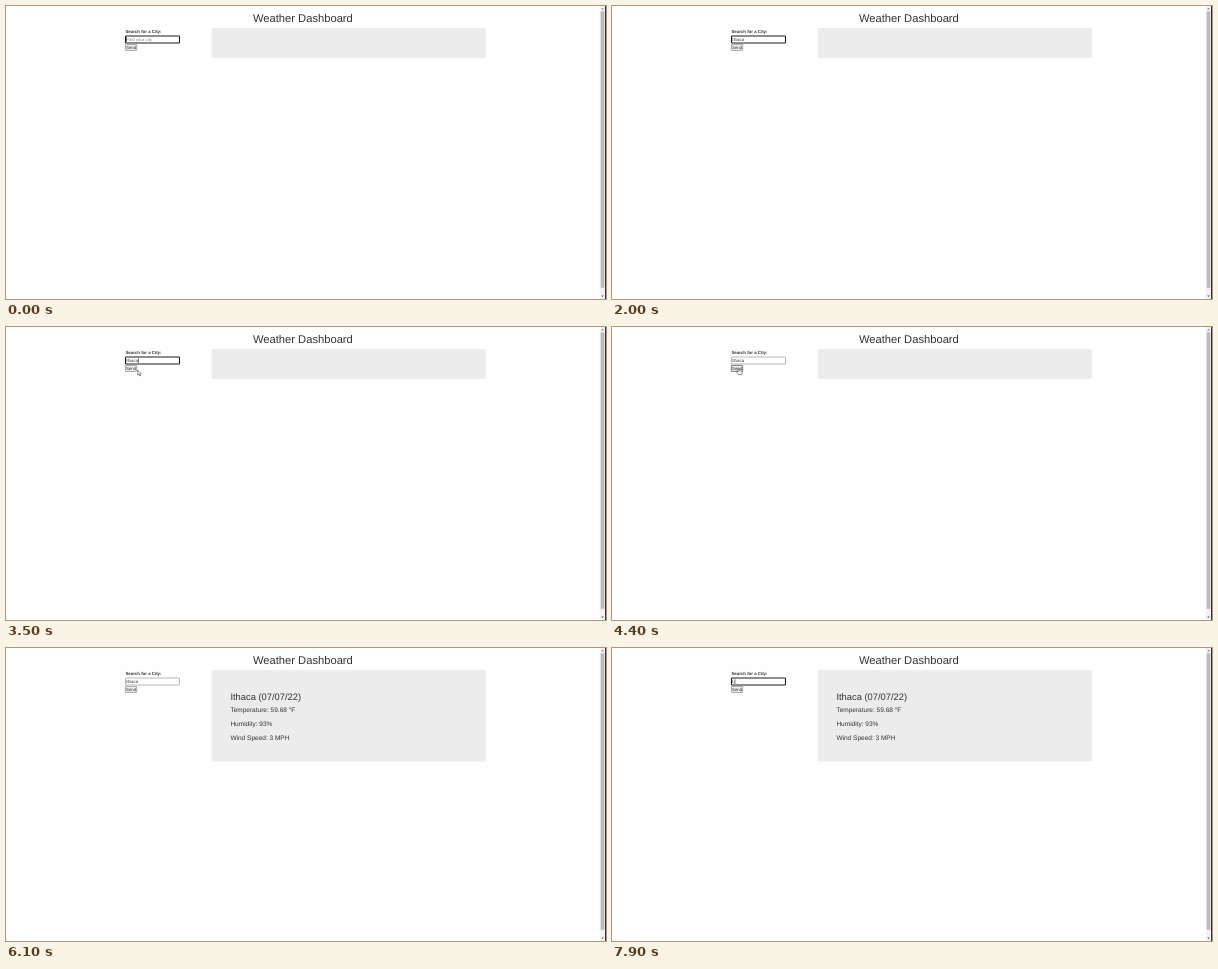
Write an HTML page that moves like this. It is 600 px wide and 293 px high and loops after 8 s.

```html
<!DOCTYPE html>
<html lang="en">
<head>
<meta charset="utf-8">
<title>Weather Dashboard</title>
<style>
html, body { margin: 0; width: 100%; height: 100%; overflow: hidden; background: #fefefe; }
svg { display: block; width: 600px; height: 293px; }
text {
  font: 4.36px "Liberation Sans", Arial, sans-serif;
  fill: #333;
  text-rendering: geometricPrecision;
  white-space: pre;
}
.title { font-size: 11.2px; }
.label { font-weight: bold; }
.city { font-size: 9.35px; }
.fact { font-size: 6.53px; }
.cursor { stroke-linejoin: round; fill: #fff; stroke: #222; stroke-width: .5; }
</style>
</head>
<body>
<svg viewBox="0 0 600 293">
  <rect width="600" height="293" fill="#fefefe"/>
  <text class="title" x="246.9" y="16.4">Weather Dashboard</text>
  <text class="label" x="119.4" y="26.5">Search for a City:</text>

  <rect id="field" x="119.5" y="30" width="54" height="7" rx=".7" fill="#fff"/>
  <rect id="selection" y="31" height="5.2" fill="#2f86ee"/>
  <text id="entry" x="120.2" y="35"></text>
  <rect id="caret" y="31.2" width=".6" height="4.8" fill="#222"/>

  <rect id="button" x="119.4" y="38.4" width="11.3" height="6" rx=".5" fill="#efefef" stroke-width=".7"/>
  <text x="120" y="42.9">Send</text>

  <rect id="panel" x="205.6" y="22.1" width="274.3" rx="1.9" fill="#edecec"/>
  <g id="report">
    <text class="city" x="224.4" y="51.7">Ithaca (07/07/22)</text>
    <text class="fact" x="224.4" y="63.7">Temperature: 59.68 °F</text>
    <text class="fact" x="224.4" y="77.8">Humidity: 93%</text>
    <text class="fact" x="224.4" y="91.9">Wind Speed: 3 MPH</text>
  </g>

  <rect x="593.8" width="5.2" height="293" fill="#f1f1f1"/>
  <rect x="594.7" y="5.3" width="3.7" height="276.5" fill="#bcbcbc"/>
  <path d="M595.3 3.3h2.4l-1.2-1.4zM595.3 289.6h2.4l-1.2 1.4z" fill="#505050"/>
  <rect x="599" width="1" height="293" fill="#333"/>

  <g id="pointer">
    <path id="arrow" class="cursor" d="M0 0V5L1.2 4L2 5.8L2.8 5.4L2 3.7H3.5Z"/>
    <path id="hand" class="cursor" d="M0 .4Q.6-.4 1.1.4V2.4L3.7 3Q4.3 3.3 4.2 4.2L3.6 6.4H.5L-1.2 4Q-1 3 0 3.8Z"/>
    <path id="beam" d="M-.8-2.5H.8M0-2.5V2.5M-.8 2.5H.8" fill="none" stroke="#333" stroke-width=".5"/>
  </g>
</svg>
<script>
const LOOP = 8000;
const PLACEHOLDER = "Find your city";
const $ = id => document.getElementById(id);
const set = (id, attrs) => {
  for (const name in attrs) $(id).setAttribute(name, attrs[name]);
};
const show = (id, on) => set(id, { visibility: on ? "inherit" : "hidden" });

// Each track is a list of [start in ms, value].
const typed = [[0, ""], [600, "I"], [800, "It"], [1000, "Ith"], [1100, "Itha"],
  [1300, "Ithac"], [1400, "Ithaca"], [7500, ""], [7900, "L"]];
const caretOn = [[0, true], [200, false], [600, true], [2000, false], [2500, true],
  [3000, false], [3500, true], [4100, false], [7500, true]];
const focused = [[0, true], [4300, false], [6500, true]];
const hovered = [[0, false], [3600, true], [6100, false]];
const selectedFrom = [[0, null], [6600, 3], [6700, 0], [7500, null]];
const loaded = [[0, false], [4500, true]];
const pointer = [[0, null],
  [3300, ["arrow", 152, 45]], [3400, ["arrow", 141, 44.6]], [3500, ["arrow", 131.8, 43.2]],
  [3600, ["hand", 127.5, 42]], [3700, ["hand", 126, 41.2]],
  [5900, ["hand", 126.4, 41.8]], [6000, ["hand", 127, 42.3]], [6100, null],
  [6400, ["beam", 135, 34]], [6500, ["beam", 132.5, 33.7]], [6600, ["beam", 125, 33.6]],
  [6700, ["beam", 114.5, 33.5]], [6800, null]];

const at = (track, time) => track.findLast(([start]) => start <= time)[1];

const pen = document.createElement("canvas").getContext("2d");
pen.font = '100px "Liberation Sans", Arial, sans-serif';
const endOf = text => 120.2 + pen.measureText(text).width * .0436;

function drawField(time) {
  const text = at(typed, time);
  const from = at(selectedFrom, time);
  const focus = at(focused, time);
  const entry = $("entry");
  entry.textContent = "";
  const addSpan = (content, fill) => {
    const span = document.createElementNS("http://www.w3.org/2000/svg", "tspan");
    span.textContent = content;
    span.style.fill = fill;
    entry.append(span);
  };
  if (!text) addSpan(PLACEHOLDER, "#858585");
  else if (from === null) addSpan(text, "#333");
  else {
    addSpan(text.slice(0, from), "#333");
    addSpan(text.slice(from), "#fff");
  }

  const start = endOf(text.slice(0, from ?? 0));
  set("selection", { x: start, width: endOf(text) - start });
  show("selection", from !== null);
  set("caret", { x: endOf(text) });
  show("caret", at(caretOn, time));
  set("field", { stroke: focus ? "#1c1c1c" : "#858585", "stroke-width": focus ? 1.1 : .6 });
}

function drawPointer(time) {
  const pose = at(pointer, time);
  for (const shape of ["arrow", "hand", "beam"]) show(shape, pose?.[0] === shape);
  if (pose) set("pointer", { transform: `translate(${pose[1]} ${pose[2]})` });
}

function render(time) {
  const done = at(loaded, time);
  drawField(time);
  set("button", { stroke: at(hovered, time) ? "#444" : "#858585" });
  set("panel", { height: done ? 91.4 : 29.9 });
  show("report", done);
  drawPointer(time);
}

const began = performance.now();
function tick() {
  render((performance.now() - began) % LOOP);
  requestAnimationFrame(tick);
}
tick();
</script>
</body>
</html>
```
